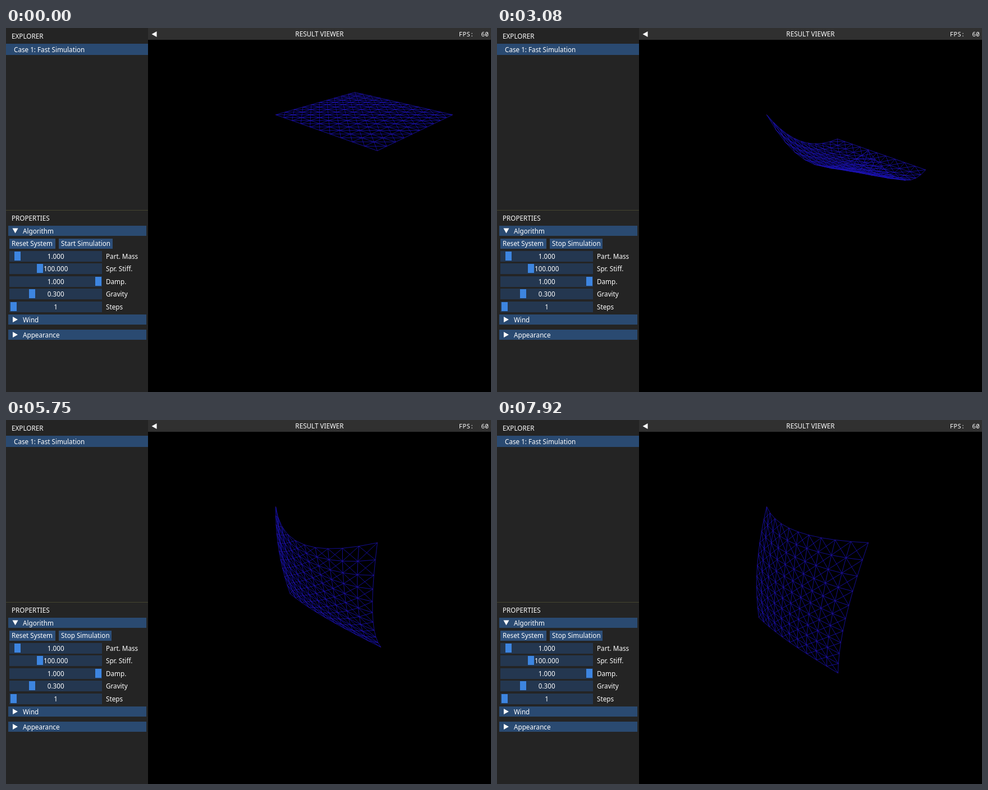
Recreate the animation shown at these times as an HTML page with a canvas. Size 864 by 648 pixels, loop 8000 ms.

```html
<!DOCTYPE html>
<html lang="en">
<head>
<meta charset="utf-8">
<title>Cloth simulation</title>
<style>
html, body { margin: 0; width: 100%; height: 100%; overflow: hidden; background: #000; }
canvas { display: block; width: 864px; height: 648px; }
</style>
</head>
<body>
<canvas id="stage" width="864" height="648"></canvas>
<script>
const ctx = document.getElementById("stage").getContext("2d");
const LOOP = 8000, STEP = 1000 / 12, STEPS = 96, START = 4;
const CELLS = 10, SIDE = CELLS + 1;
const UI_FONT = "11.7px 'Noto Sans', 'Open Sans', sans-serif";
const MONO_FONT = "11px 'Noto Sans Mono', 'DejaVu Sans Mono', monospace";
const HEADER = "#2a4a71", BUTTON = "#2d4f7a", TRACK = "#243750", GRAB = "#3d85e0";

// The sheet hangs from two pinned corners; near corners get larger cells.
const PIN_A = [480, 154], PIN_B = [661, 218];
const DEPTH = { a: 1, b: 0.764, near: 0.986, far: 1.222 };

// Key poses: the two free corners, and how far three edges sag off their chords.
const poses = [
  { at: START, near: [795, 154], far: [621, 114], top: [0, 0], left: [0, 0], right: [0, 0] },
  { at: 37, near: [763, 252], far: [606, 197], top: [6, 54], left: [-7, 21], right: [-1, 28] },
  { at: 49, near: [728, 319], far: [567, 257], top: [-12, 45], left: [-3, 11], right: [-18, 12] },
  { at: 61, near: [690, 375], far: [527, 290], top: [-21, 40], left: [-6, -1], right: [-13, 17] },
  { at: 95, near: [607, 450], far: [466, 351], top: [-20, 15], left: [-8, -4], right: [-9, 4] }
];

function slope(k, part, c) {
  const p = poses[k], q = poses[k + 1];
  return (q[part][c] - p[part][c]) / (q.at - p.at);
}

// Starts at rest, passes each pose on a parabola, eases out at the end.
function tangent(k, part, c) {
  if (k === 0) return 0;
  if (k === poses.length - 1) return 2 * slope(k - 1, part, c) - tangent(k - 1, part, c);
  const before = poses[k].at - poses[k - 1].at, after = poses[k + 1].at - poses[k].at;
  return (slope(k - 1, part, c) * after + slope(k, part, c) * before) / (before + after);
}

function partAt(part, step) {
  let k = 0;
  while (k < poses.length - 2 && step >= poses[k + 1].at) k++;
  const p = poses[k], q = poses[k + 1], span = q.at - p.at;
  const s = Math.max(0, (step - p.at) / span), r = 1 - s;
  return [0, 1].map(c =>
    r * r * (1 + 2 * s) * p[part][c] + s * s * (3 - 2 * s) * q[part][c] +
    span * s * r * (r * tangent(k, part, c) - s * tangent(k + 1, part, c)));
}

// Edge sag profile, 1 at a third of the way; a higher power is flatter.
function sag(t, power = 2) {
  return (1 - Math.abs(2 * t - 1) ** power) / (1 - 3 ** -power);
}

function clothAt(step) {
  const [near, far, top, left, right] =
    ["near", "far", "top", "left", "right"].map(part => partAt(part, step));
  const power = Math.max(2, 10 - (step - START) / 4);
  const grid = [];
  for (let j = 0; j < SIDE; j++) {
    for (let i = 0; i < SIDE; i++) {
      const u = i / CELLS, v = j / CELLS;
      const wa = DEPTH.a * (1 - u) * (1 - v), wb = DEPTH.b * u * (1 - v);
      const wn = DEPTH.near * u * v, wf = DEPTH.far * (1 - u) * v;
      const across = sag(u, power), down = sag(v);
      const inner = 1 - 4.8 * u * v * (1 - u) * (1 - v);
      grid.push([0, 1].map(c => {
        const flat = (wa * PIN_A[c] + wb * PIN_B[c] + wn * near[c] + wf * far[c]) / (wa + wb + wn + wf);
        const hem = c === 0 ? 0.35 * Math.min(0, top[0]) * sag(u) : 0;
        const bend = (1 - v) * across * top[c] + v * hem +
          down * ((1 - u) * left[c] + u * right[c]);
        return flat + inner * bend;
      }));
    }
  }
  return grid;
}

// Structural and shear springs.
const springs = [];
for (let j = 0; j < SIDE; j++) {
  for (let i = 0; i < SIDE; i++) {
    for (const [di, dj] of [[1, 0], [0, 1], [1, 1], [-1, 1]]) {
      const x = i + di, y = j + dj;
      if (x >= 0 && x <= CELLS && y <= CELLS) springs.push([j * SIDE + i, y * SIDE + x]);
    }
  }
}

function drawCloth(step) {
  const grid = clothAt(step);
  ctx.strokeStyle = "#1a12b8";
  ctx.lineWidth = 0.8;
  ctx.beginPath();
  for (const [a, b] of springs) {
    ctx.moveTo(grid[a][0] + 0.5, grid[a][1] + 0.5);
    ctx.lineTo(grid[b][0] + 0.5, grid[b][1] + 0.5);
  }
  ctx.stroke();
  ctx.fillStyle = "rgba(150, 20, 70, 0.45)";
  for (const [x, y] of grid) ctx.fillRect(x, y, 1, 1);
}

function box(x, y, w, h, color) {
  ctx.fillStyle = color;
  ctx.fillRect(x, y, w, h);
}

function label(str, x, cy, align = "left", font = UI_FONT) {
  ctx.font = font;
  ctx.textAlign = align;
  ctx.fillStyle = "#fff";
  ctx.fillText(str, x, cy + 4.2);
}

// Arrowhead centred on (x, y), pointing along the given angle.
function arrow(x, y, angle) {
  ctx.save();
  ctx.translate(x, y);
  ctx.rotate(angle);
  ctx.fillStyle = "#fff";
  ctx.beginPath();
  ctx.moveTo(-4.5, -5);
  ctx.lineTo(4.5, 0);
  ctx.lineTo(-4.5, 5);
  ctx.fill();
  ctx.restore();
}

function section(str, y, open) {
  box(4, y, 246, 18, HEADER);
  arrow(16.5, y + 9, open ? Math.PI / 2 : 0);
  label(str, 30, y + 9.3);
}

function button(str, x, w) {
  box(x, 375, w, 18, BUTTON);
  label(str, x + 4, 384);
}

const sliders = [
  ["Part. Mass", "1.000", 15],
  ["Spr. Stiff.", "100.000", 55],
  ["Damp.", "1.000", 159],
  ["Gravity", "0.300", 41],
  ["Steps", "1", 8]
];

function drawPanels(running) {
  box(0, 0, 253, 648, "#242424");
  label("EXPLORER", 10, 14.3);
  box(0, 28, 253, 20, HEADER);
  label("Case 1: Fast Simulation", 14, 38.5);

  box(0, 324, 253, 1, "#45452f");
  label("PROPERTIES", 10, 338.5);
  section("Algorithm", 352, true);
  button("Reset System", 6, 82);
  if (running) button("Stop Simulation", 94, 94);
  else button("Start Simulation", 94, 96);
  sliders.forEach(([name, value, grab], i) => {
    const y = Math.floor(397 + i * 22.5);
    box(6, y, 165, 19, TRACK);
    box(grab, y + 1, 11, 16, GRAB);
    label(value, 88.7, y + 9.5, "center");
    label(name, 178, y + 9.5);
  });
  section("Wind", 510, false);
  section("Appearance", 537, false);

  box(253, 0, 611, 21, "#303030");
  arrow(264, 11, Math.PI);
  label("RESULT VIEWER", 558.5, 11.2, "center");
  label("FPS:  60", 807, 11.2, "left", MONO_FONT);
}

const origin = performance.now();
function draw() {
  const t = Math.max(0, performance.now() - origin) % LOOP;
  const step = Math.floor((t + 5) / STEP) % STEPS;
  box(0, 0, 864, 648, "#000");
  drawPanels(step >= START);
  drawCloth(step);
  requestAnimationFrame(draw);
}
draw();
</script>
</body>
</html>
```
